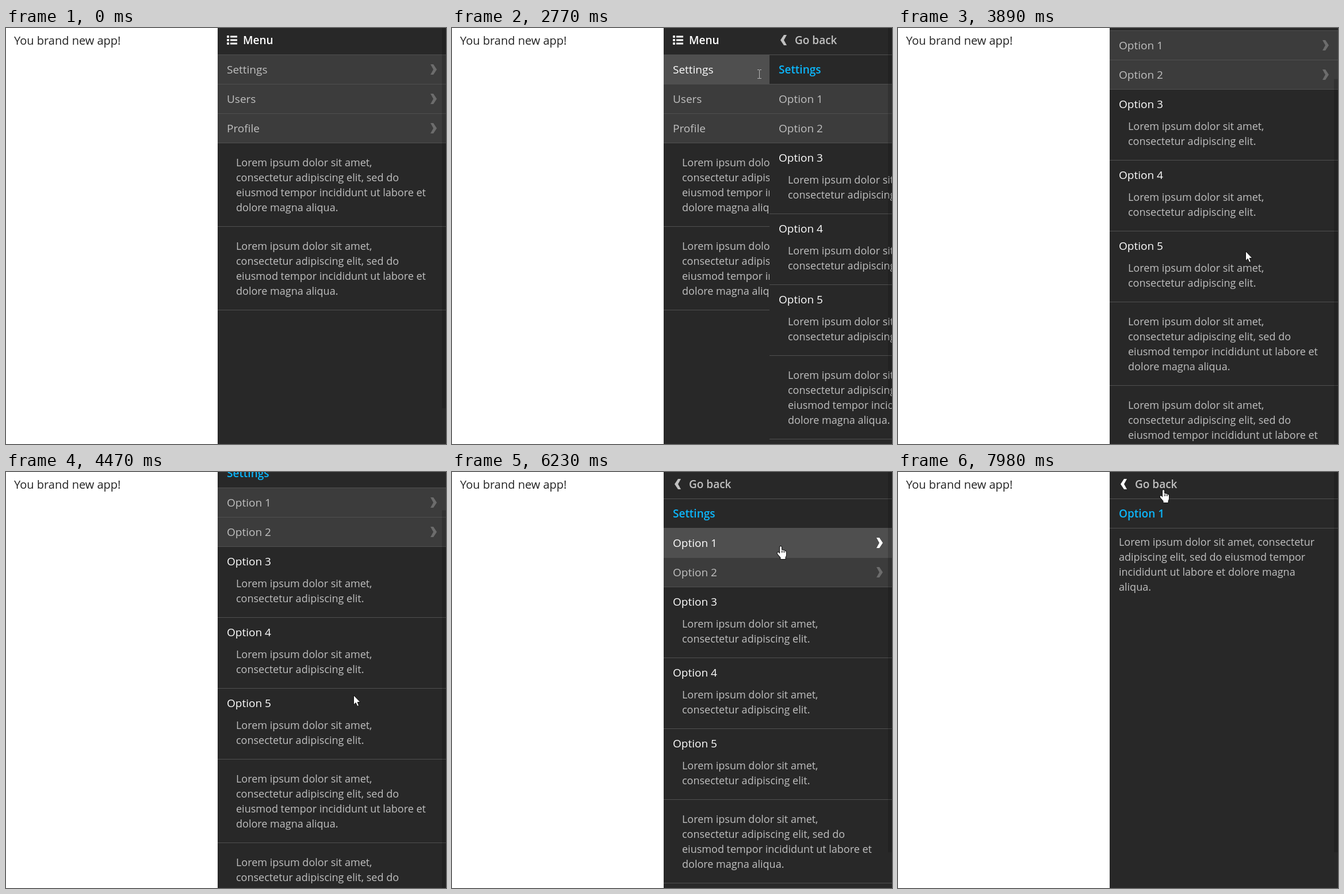
An HTML page with a canvas for the animation above (8 s loop, 765x722 px).

```html
<!DOCTYPE html>
<html lang="en">
<head>
<meta charset="utf-8">
<title>Sliding menu</title>
<style>
  html, body { margin: 0; width: 100%; height: 100%; overflow: hidden; background: #fff; }
  canvas { display: block; width: 765px; height: 722px; }
</style>
</head>
<body>
<canvas id="stage" width="765" height="722"></canvas>
<script>
const ctx = document.getElementById('stage').getContext('2d');
const LOOP = 8000, W = 765, H = 722, LEFT = 368, PANEL = W - LEFT;
const HEADER = 46, ROW_H = 51, LINE_H = 26;
const GREY = '#c0c0c0', WHITE = '#ffffff', BLUE = '#0cb6fb';
const BG = '#282828', ROW = '#3c3c3c', HOVER = '#4f4f4f', RULE = '#505050', DIM = '#6c6c6c';
const font = (size, weight = 400) => `${weight} ${size}px "Open Sans", sans-serif`;

const LONG = ['Lorem ipsum dolor sit amet,', 'consectetur adipiscing elit, sed do',
  'eiusmod tempor incididunt ut labore et', 'dolore magna aliqua.'];
const SHORT = ['Lorem ipsum dolor sit amet,', 'consectetur adipiscing elit.'];
const WIDE = ['Lorem ipsum dolor sit amet, consectetur', 'adipiscing elit, sed do eiusmod tempor',
  'incididunt ut labore et dolore magna', 'aliqua.'];

// Stack items below the header: strings are rows, objects are text blocks.
function build(title, items, body) {
  const panel = { title, rules: [HEADER], rows: [], heads: [], paras: [] };
  let y = HEADER;
  const advance = h => panel.rules.push(y += h);
  if (title) advance(ROW_H);
  for (const item of items) {
    if (typeof item === 'string') {
      panel.rows.push({ y, text: item });
      advance(ROW_H);
    } else {
      const top = item.head ? ROW_H : 21;
      if (item.head) panel.heads.push({ y, text: item.head });
      panel.paras.push({ y: y + top, x: 32, lines: item.lines });
      advance(top + item.lines.length * LINE_H + 20);
    }
  }
  if (body) panel.paras.push({ y: y + 11, x: 16, lines: body });
  return panel;
}

const long = { lines: LONG };
const short = n => ({ head: `Option ${n}`, lines: SHORT });
const panels = [
  build('', ['Settings', 'Users', 'Profile', long, long]),
  build('Settings', ['Option 1', 'Option 2', ...[3, 4, 5].map(short), long, long]),
  build('Option 1', [], WIDE)
];

const START = { x: 687, y: 659 };
const leg = (from, to, x, y) => ({ from, to, x, y });
const legs = [
  leg(600, 1270, 630, 530),
  leg(1270, 1410, 579, 559),
  leg(1410, 2140, 534, 80),
  leg(3240, 3490, 605, 388),
  leg(4640, 4920, 566, 372),
  leg(4920, 5180, 573, 160),
  leg(5180, 5500, 573, 133),
  leg(7150, 7370, 512, 231),
  leg(7540, 7980, 463, 35)
];

const clamp = v => Math.max(0, Math.min(1, v));
const smooth = v => v * v * (3 - 2 * v);
const ramp = (t, a, b) => clamp((t - a) / (b - a));
const slide = (t, start) => smooth(Math.pow(ramp(t, start, start + 335), 1.55));

function pointerAt(t) {
  let { x, y } = START;
  for (const g of legs) {
    const u = smooth(ramp(t, g.from, g.to));
    x += (g.x - x) * u;
    y += (g.y - y) * u;
  }
  return { x: Math.round(x), y: Math.round(y) };
}

function scrollAt(t) {
  const out = ramp(t, 3690, 3970), back = ramp(t, 4370, 4650);
  return Math.round(100 * (1 - (1 - out) ** 2.1) * (1 - smooth(back)));
}

function text(str, x, y, color, size = 19, weight = 400) {
  ctx.font = font(size, weight);
  ctx.fillStyle = color;
  ctx.fillText(str, x, y);
}

function shape(x, y, pts, fill, stroke) {
  ctx.beginPath();
  pts.forEach(([px, py]) => ctx.lineTo(x + px, y + py));
  ctx.closePath();
  ctx.fillStyle = fill;
  ctx.fill();
  if (stroke) {
    ctx.strokeStyle = stroke;
    ctx.lineWidth = 1;
    ctx.stroke();
  }
}

// dir 1 points right, -1 left; x is the tail edge
function chevron(x, y, dir, color) {
  const pts = [[0, -9], [5, -9], [11, 0], [5, 9], [0, 9], [5, 0]];
  shape(x, y, pts.map(([a, b]) => [a * dir, b]), color);
}

function listIcon(x, y) {
  ctx.fillStyle = WHITE;
  for (let i = 0; i < 3; i++) {
    ctx.beginPath();
    ctx.roundRect(x, y + i * 6, 4, 4, 1.2);
    ctx.fill();
    ctx.fillRect(x + 6, y + i * 6 + .5, 12, 3);
  }
}

function drawPanel(panel, x, scroll, hover) {
  ctx.save();
  ctx.translate(x, 0);
  ctx.fillStyle = BG;
  ctx.fillRect(0, 0, PANEL, H);
  ctx.translate(0, -scroll);

  if (panel.title) {
    chevron(30, 21, -1, hover === 'back' ? WHITE : GREY);
    text('Go back', 44, 28, GREY, 19, 600);
    text(panel.title, 16, 79, BLUE, 19, 600);
  } else {
    listIcon(16, 13);
    text('Menu', 44, 28, WHITE, 19, 600);
  }
  for (const r of panel.rows) {
    ctx.fillStyle = r === hover ? HOVER : ROW;
    ctx.fillRect(0, r.y, PANEL, ROW_H);
  }
  ctx.fillStyle = RULE;
  panel.rules.forEach(y => ctx.fillRect(0, y, PANEL, 1));
  for (const r of panel.rows) {
    text(r.text, 16, r.y + 33, r === hover ? WHITE : GREY);
    chevron(370, r.y + 26, 1, r === hover ? WHITE : DIM);
  }
  panel.heads.forEach(h => text(h.text, 16, h.y + 33, WHITE));
  for (const p of panel.paras)
    p.lines.forEach((line, i) => text(line, p.x, p.y + 20 + i * LINE_H, GREY, 18));
  ctx.restore();
}

function hoverOf(panel, p, scroll) {
  const y = p.y + scroll;
  if (panel.title && y < HEADER) return 'back';
  return panel.rows.find(r => y >= r.y && y < r.y + ROW_H);
}

function overText(panel, p, scroll) {
  ctx.font = font(18);
  return panel.paras.some(q => {
    const line = q.lines[Math.floor((p.y + scroll - q.y) / LINE_H)], x = p.x - LEFT - q.x;
    return line && x >= 0 && x <= ctx.measureText(line).width;
  });
}

function arrow({ x, y }) {
  shape(x + .5, y + .5, [[-1, -1], [-1, 15.5], [2.7, 12], [5.2, 18], [8, 17], [5.6, 11], [10.5, 11]],
    WHITE, '#111');
}

function beam({ x, y }) {
  ctx.fillStyle = '#b4b4b4';
  ctx.fillRect(x, y - 7, 1, 15);
  for (const end of [y - 8, y + 7]) {
    ctx.fillRect(x - 3, end, 3, 1);
    ctx.fillRect(x + 1, end, 3, 1);
  }
}

const HAND = new Path2D('M5 2.5Q5 1 6.5 1T8 2.5V7.5Q9.5 6.8 11 8Q12.5 7.4 13.7 9Q16 8.6 16 11V16' +
  'Q16 18 14.5 20V23H6.5V20.5L1.2 14.2Q0 12 1.5 11.4Q3 11 5 14Z');

function hand({ x, y }) {
  ctx.save();
  ctx.translate(x - 8, y - 5);
  ctx.fillStyle = WHITE;
  ctx.strokeStyle = '#111';
  ctx.lineWidth = 2;
  ctx.stroke(HAND);
  ctx.fill(HAND);
  ctx.lineWidth = 1;
  ctx.beginPath();
  for (const gap of [8.5, 11, 13.5]) {
    ctx.moveTo(gap, 8.5);
    ctx.lineTo(gap, 12);
  }
  ctx.stroke();
  ctx.restore();
}

function draw(t) {
  const first = slide(t, 2550), second = slide(t, 6570);
  const level = (first === 1) + (second === 1);
  const moving = [first, second, 0][level];
  const scroll = level === 1 ? scrollAt(t) : 0;
  const shown = t >= 620, p = pointerAt(t), panel = panels[level];
  const hover = shown ? hoverOf(panel, p, scroll) : undefined;

  ctx.fillStyle = WHITE;
  ctx.fillRect(0, 0, W, H);
  text('You brand new app!', 14, 29, '#222', 20);
  drawPanel(panel, LEFT, scroll, hover);
  if (moving > 0)
    drawPanel(panels[level + 1], LEFT + Math.round(PANEL * (1 - moving)), 0);

  ctx.fillStyle = 'rgba(0,0,0,.16)';
  ctx.fillRect(758, scroll * .95, 7, 660);

  if (!shown) return;
  if (moving > .1 || overText(panel, p, scroll)) beam(p);
  else if (hover) hand(p);
  else arrow(p);
}

function tick() {
  draw(performance.now() % LOOP);
  requestAnimationFrame(tick);
}
tick();
</script>
</body>
</html>
```
